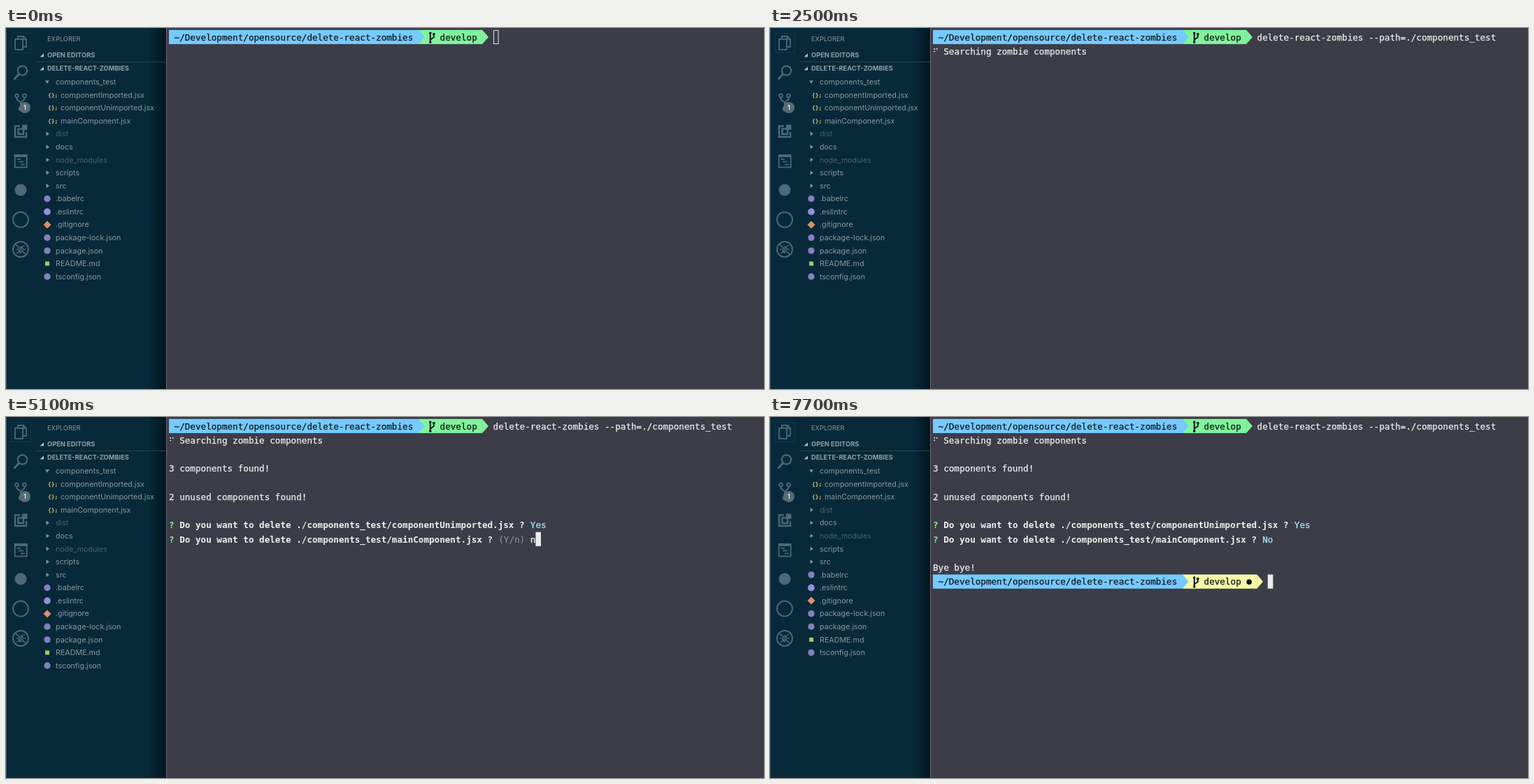
An HTML page with a canvas for the animation above (7800 ms loop, 1084 px wide and 517 px high).

```html
<!DOCTYPE html>
<html lang="en">
<head>
<meta charset="utf-8">
<title>Terminal session</title>
<style>
html, body { margin: 0; width: 100%; height: 100%; overflow: hidden; background: #3c3d49; }
canvas { display: block; }
</style>
</head>
<body>
<canvas id="stage" width="1084" height="517"></canvas>
<script>
const g = document.getElementById('stage').getContext('2d');
const LOOP = 7800, CELL = 7.6, LINE = 20.25, LEFT = 233, TOP = 2.8;
const MONO = '12.62px "DejaVu Sans Mono", monospace';
const SANS = 'Inter, "Open Sans", sans-serif';
const WHITE = '#f1f1ee', BLUE = '#75caff', GREEN = '#80f49a', YELLOW = '#f5f9a8',
      CYAN = '#a8e6fb', GREY = '#8d8c95', INK = '#10141b', ICON = '#4e6977',
      LABEL = '#8b99a0', DIM = '#4d616c';

// moments of the session, in ms
const AT = { focus: 400, command: 900, enter: 1400, search: 1700, found: 2700,
             y: 4400, yes: 4700, n: 5100, no: 5400, bye: 5500, removed: 5600, prompt: 6000 };

const files = [
  ['components_test', 'open'], ['componentImported.jsx', 'jsx'],
  ['componentUnimported.jsx', 'jsx'], ['mainComponent.jsx', 'jsx'],
  ['dist', 'ignored'], ['docs', 'dir'], ['node_modules', 'ignored'],
  ['scripts', 'dir'], ['src', 'dir'], ['.babelrc', 'json'], ['.eslintrc', 'lint'],
  ['.gitignore', 'git'], ['package-lock.json', 'json'], ['package.json', 'json'],
  ['README.md', 'md'], ['tsconfig.json', 'json']
];

function rect(x, y, w, h, color) {
  g.fillStyle = color;
  g.fillRect(x, y, w, h);
}

function poly(color, ...p) {
  g.fillStyle = color;
  g.beginPath();
  for (let i = 0; i < p.length; i += 2) g.lineTo(p[i], p[i + 1]);
  g.fill();
}

function line(color, width, ...p) {
  g.strokeStyle = color;
  g.lineWidth = width;
  g.beginPath();
  for (let i = 0; i < p.length; i += 2) g.lineTo(p[i], p[i + 1]);
  g.stroke();
}

function box(x, y, w, h, color, width) {
  g.strokeStyle = color;
  g.lineWidth = width;
  g.strokeRect(x, y, w, h);
}

function disc(x, y, r, color, width) {
  g.beginPath();
  g.arc(x, y, r, 0, 7);
  g.fillStyle = g.strokeStyle = color;
  g.lineWidth = width;
  width ? g.stroke() : g.fill();
}

function text(s, x, y, color, font) {
  g.font = font;
  g.fillStyle = color;
  g.fillText(s, x, y);
}

function activityBar() {
  // pages
  box(7.5, 7.5, 28, 28, '#143746', 1);
  line(ICON, 1.8, 17, 15, 17, 12, 25, 12, 29, 16, 29, 27, 25, 27);
  line(ICON, 1.5, 24.5, 12, 24.5, 16.5, 29, 16.5);
  box(13, 16, 11, 15, ICON, 1.8);
  // magnifier
  disc(23.5, 61, 6.7, ICON, 2.2);
  line(ICON, 3, 18.5, 66, 11.5, 73.5);
  // branches
  line(ICON, 2, 15.5, 99, 15.5, 102, 21, 107, 26.5, 102, 26.5, 99);
  line(ICON, 2, 21, 107, 21, 114);
  for (const [x, y] of [[15.5, 97], [26.5, 97], [21, 116]]) disc(x, y, 2.4, ICON, 1.7);
  disc(27, 114, 8, '#596c76');
  g.textAlign = 'center';
  text('1', 27, 117.3, '#f0f2f3', '600 9px ' + SANS);
  g.textAlign = 'left';
  // blocks
  line(ICON, 2.4, 20, 140.5, 13, 140.5, 13, 156, 29, 156, 29, 149);
  box(17.5, 144.5, 7.5, 7.5, ICON, 2.4);
  rect(23, 138.5, 7.5, 7.5, ICON);
  // list panel
  box(12.7, 182, 17, 17.5, ICON, 1.8);
  rect(12, 181, 18, 4, ICON);
  line(ICON, 1.7, 15.5, 188, 21, 188);
  line(ICON, 1.7, 18, 191.5, 25, 191.5);
  line(ICON, 1.7, 21, 195.5, 27, 195.5);
  disc(21, 232, 8.5, ICON);
  disc(21, 274.5, 11, ICON, 1.9);
  // crossed-out bug
  disc(21, 317, 11, ICON, 1.9);
  g.beginPath();
  g.ellipse(21, 317.5, 3.7, 5, 0, 0, 7);
  g.fillStyle = ICON;
  g.fill();
  for (const s of [-1, 1]) {
    line(ICON, 1.2, 21, 317, 21 + s * 7, 317);
    line(ICON, 1.2, 21, 315, 21 + s * 6, 311);
    line(ICON, 1.2, 21, 319, 21 + s * 6, 323);
  }
  line('#072939', 3.4, 14, 310, 28, 324);
  line(ICON, 1.7, 13.5, 309.5, 28.5, 324.5);
}

function fileIcon(kind, y) {
  if (kind === 'open') poly('#84939a', 56, 75.2, 62, 75.2, 59, 79.8);
  else if (kind === 'dir' || kind === 'ignored') poly('#84939a', 57.5, y - 3, 62, y, 57.5, y + 3);
  else if (kind === 'jsx') text('{};', 60, y + 2.8, '#e2d173', 'bold 7.8px "DejaVu Sans Mono", monospace');
  else if (kind === 'json') disc(59, y, 4.7, '#8580bd');
  else if (kind === 'lint') disc(59, y, 4.9, '#9590dc');
  else if (kind === 'git') poly('#dc8f6b', 59, y - 5.5, 64.5, y, 59, y + 5.5, 53.5, y);
  else rect(56, y - 3, 6, 6, '#a5c966');
}

function sidebar(t) {
  rect(0, 0, 229, 517, '#072939');
  const shade = g.createLinearGradient(203, 0, 229, 0);
  shade.addColorStop(0, 'rgba(0,18,27,0)');
  shade.addColorStop(1, 'rgba(0,18,27,.8)');
  rect(203, 0, 26, 517, shade);
  rect(0, 0, 1, 517, '#38505c');
  rect(229, 0, 1, 517, '#746775');
  activityBar();

  text('EXPLORER', 59, 18.5, LABEL, '9.3px ' + SANS);
  [['OPEN EDITORS', 39], ['DELETE-REACT-ZOMBIES', 58]].forEach(([s, y]) => {
    poly('#b4c0c5', 54, y - 2.5, 54, y + 2.5, 48.5, y + 2.5);
    text(s, 59, y + 3.4, '#8fa1aa', 'bold 9.3px ' + SANS);
  });
  rect(43, 48, 185, 1, '#303d48');

  const shown = files.filter(f => t < AT.removed || f[0] !== 'componentUnimported.jsx');
  shown.forEach(([name, kind], i) => {
    const y = 77.3 + i * 18.58;
    fileIcon(kind, y);
    text(name, kind === 'jsx' ? 78 : 71, y + 3.8, kind === 'ignored' ? DIM : LABEL, '10.7px ' + SANS);
  });
}

// terminal text on the character grid
function put(s, col, row, color = WHITE, bold = false) {
  const x = LEFT + col * CELL, y = TOP + row * LINE + 14.8;
  text(s, x, y, color, (bold ? 'bold ' : '') + MONO);
  if (bold) return;
  g.strokeStyle = color;
  g.lineWidth = 0.25;
  g.strokeText(s, x, y);
}

function cursor(col, row, hollow) {
  const x = LEFT + col * CELL, y = TOP + row * LINE;
  if (hollow) box(Math.round(x) + 0.5, y + 0.7, 6.6, 19, '#e6e6e6', 1);
  else rect(x, y, CELL, LINE, '#ebebeb');
}

function segment(from, to, row, color) {
  const a = LEFT + from * CELL, b = LEFT + to * CELL, y = TOP + row * LINE;
  rect(a, y, b - a, LINE, color);
  poly(color, b - 0.3, y, b + 8.6, y + LINE / 2, b - 0.3, y + LINE);
}

function prompt(row, dirty) {
  segment(47, dirty ? 61 : 59, row, dirty ? YELLOW : GREEN);
  segment(0, 47, row, BLUE);
  put('~/Development/opensource/delete-react-zombies', 1, row, INK);
  put('develop', 51, row, INK);
  const y = TOP + row * LINE;
  line(INK, 2, 606.8, y + 3.5, 606.8, y + 18.5);
  line(INK, 1.8, 606.8, y + 14, 611.8, y + 10.5, 611.8, y + 6);
  disc(606.8, y + 4.5, 1.7, INK);
  disc(611.8, y + 6, 1.9, INK);
  disc(606.8, y + 17.5, 1.7, INK);
  if (dirty) disc(685.2, y + 10.8, 3.8, INK);
}

// returns the column where the answer starts
function question(file, row) {
  const s = `Do you want to delete ./components_test/${file} ?`;
  put('?', 0, row, GREEN, true);
  put(s, 2, row, WHITE, true);
  return s.length + 3;
}

function ask(t, file, row, key, typed, done, answer) {
  const col = question(file, row);
  if (t >= done) return put(answer, col, row, CYAN);
  put('(Y/n)', col, row, GREY);
  const pressed = t >= typed;
  if (pressed) put(key, col + 6, row);
  cursor(col + 6 + pressed, row);
}

function terminal(t) {
  prompt(0, false);
  if (t < AT.command) return cursor(61, 0, t < AT.focus);
  const command = 'delete-react-zombies --path=./components_test';
  put(command, 61, 0);
  if (t < AT.enter) return cursor(61 + command.length, 0);
  if (t < AT.search) return cursor(0, 1);

  for (const [x, y] of [[235.2, 30], [238.8, 30], [235.2, 33.6]]) disc(x, y, 0.95, WHITE);
  put('Searching zombie components', 2, 1);
  if (t < AT.found) return;

  put('3 components found!', 0, 3);
  put('2 unused components found!', 0, 5);
  ask(t, 'componentUnimported.jsx', 7, 'y', AT.y, AT.yes, 'Yes');
  if (t < AT.yes) return;
  ask(t, 'mainComponent.jsx', 8, 'n', AT.n, AT.no, 'No');
  if (t < AT.no) return;
  if (t < AT.bye) return cursor(0, 9);

  put('Bye bye!', 0, 10);
  if (t < AT.prompt) return cursor(0, 11);
  prompt(11, true);
  cursor(63, 11);
}

function draw() {
  const t = performance.now() % LOOP;
  rect(0, 0, 1084, 517, '#3c3d49');
  sidebar(t);
  terminal(t);
  requestAnimationFrame(draw);
}
draw();
</script>
</body>
</html>
```
